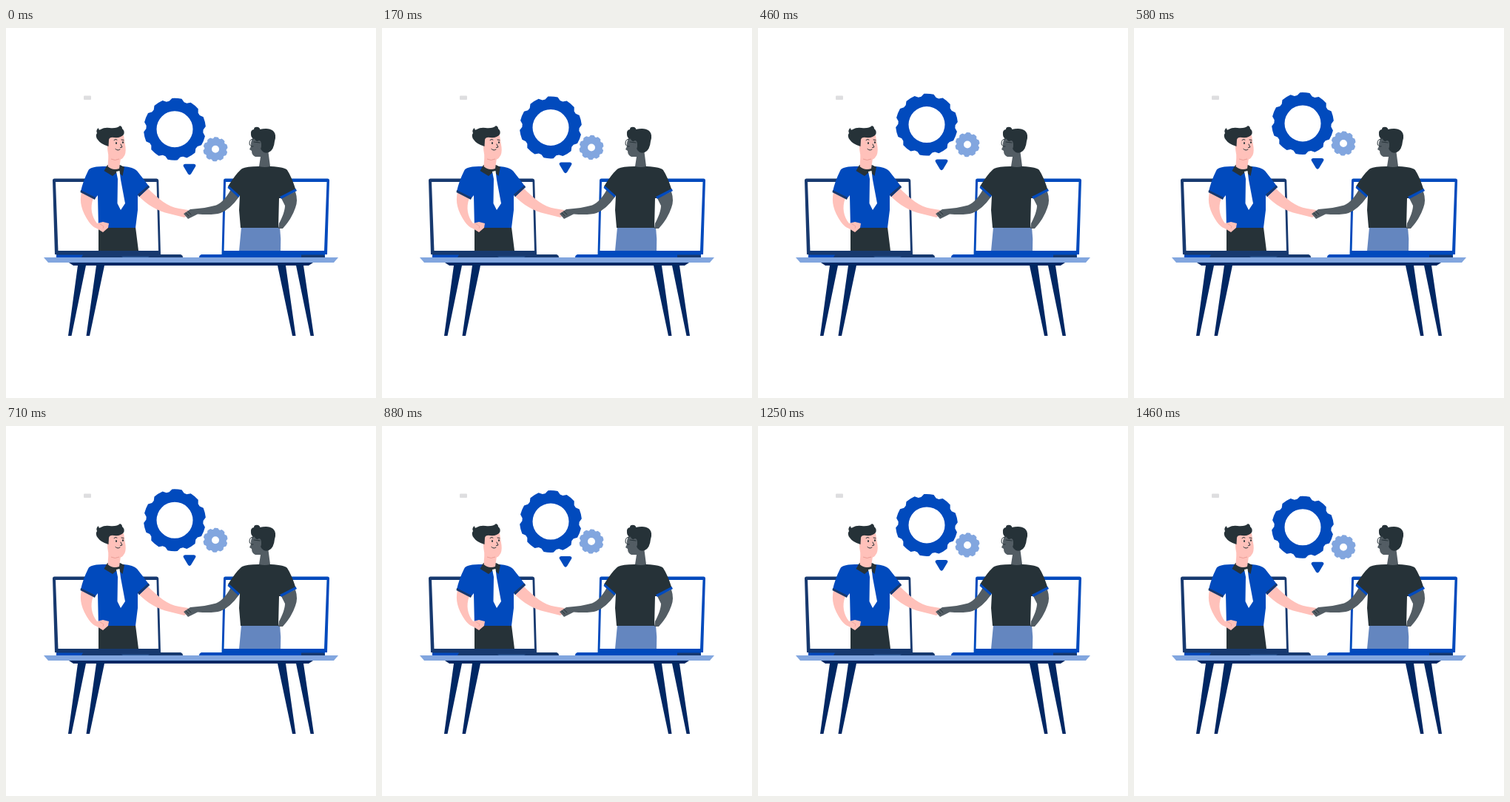
Recreate the animation shown at these times as an HTML page. Size 500x500 px, loop 1500 ms.

```html
<!DOCTYPE html>
<html lang="en">
<head>
<meta charset="utf-8">
<style>
  html, body { margin: 0; width: 100%; height: 100%; overflow: hidden; background: #fff; }
  svg { display: block; width: 100vw; height: 100vh; }
  .blue { fill: #014abd; }
  .sky { fill: #82a6df; }
  .navy { fill: #002763; }
  .steel { fill: #17396f; }
  .ink { fill: #263238; }
  .pink { fill: #ffc1ba; }
  .skin { fill: #535d64; }
  .line { fill: none; stroke: #263238; stroke-width: 1; stroke-linecap: round; }
</style>
</head>
<body>
<svg viewBox="0 0 500 500">
  <rect x="105" y="91.5" width="10" height="5.5" rx="1" fill="#dedee0"/>

  <g id="floating">
    <path id="bigGear" class="blue" fill-rule="evenodd"/>
    <path id="smallGear" class="sky" fill-rule="evenodd"/>
    <path class="blue" d="M242 184H254Q257.500 184.500 256 187.500L250.300 197Q248 200.500 245.700 197L240 187.500Q238.500 184.500 242 184Z"/>
  </g>

  <g id="laptops" fill-rule="evenodd">
    <path class="steel" d="M65.500 203.500H203.500Q206 203.500 206.200 206L209 306H66L63 206Q63 203.500 65.500 203.500ZM67 208L70.500 301H206L203.500 208Z"/>
    <path class="blue" d="M296.500 203.500H434.500Q437 203.500 437 206L434 306H291.500L294 206Q294 203.500 296.500 203.500ZM297 208L294.500 301H430L433.500 208Z"/>
  </g>

  <g id="leftPerson">
    <path class="ink" d="M125 269H175L179 301H125Z"/>
    <path class="pink" d="M179 227C190 238 205 248 221 251L241 256L248 251L246 246L234 244C218 241.500 206 231 191 216Z"/>
    <path class="blue" d="M136 187C121 187 113 188 111 193Q104 207 101 221L120 231L124 226L125 270H175L178 246V226L180 228L194 215Q185 203 177 193Q172 188 159 187Z"/>
    <path class="pink" d="M102 222C99 235 102 247 112 262Q117 269 123 271L131 276L138 270L139 264L131 262L123 264C116 255 113 243 118 230Z"/>
    <path class="steel" d="M101 219L121 229L120 232L100.500 222ZM178 225L192.500 212.500L194 215L180 228Z"/>
    <path class="ink" d="M137 185L132.500 193L144 200L151 194L157.500 200L160 188L154 185Z"/>
    <path class="pink" d="M138.500 172L137.500 187Q144 193 153 190L155 176Z"/>
    <path d="M149 194L153.500 193L155 205L161 237L155 246L150.500 237L151 204Z" fill="#fff"/>
    <path class="pink" d="M138 151L137 160Q137 165 138 170L139 176Q143 179 152 178Q157 178 159 174Q162.500 170 161.500 161L159 145H140Z"/>
    <path class="ink" d="M138.500 160Q128 157 124 151Q120 146 123 142Q121 138 125 135Q125 139 128 137Q133 134 140 135Q150 136 154 132Q157 133 157 136Q161 139 159 144Q155 149 146 148Q140 147 139 151Z"/>
    <ellipse class="ink" cx="149" cy="155.500" rx="1" ry="1.600"/>
    <ellipse class="ink" cx="158" cy="154.500" rx="1" ry="1.600"/>
    <path class="line" d="M146 151.500Q148 149.500 150 151M156 151L159 151.500M155 157L157 161L154.500 161.500M148 163.500Q151 166.500 154 164"/>
    <path d="M142 177Q147 180 153 177" fill="none" stroke="#eb9d96"/>
    <path d="M126 264L132 268L131 271" fill="none" stroke="#eb9d96" stroke-width=".7"/>
  </g>

  <g id="rightPerson">
    <path fill="#6486bf" d="M318 269H370Q372 285 371 301H315Z"/>
    <path class="skin" d="M391 221Q395 233 391 243Q386 258 374 271L368 271L369 264C374 255 377 246 377 240L372 230Z"/>
    <path class="skin" d="M304 218C298 229 292 236 284 239.500Q270 243.500 249 245L240 251L246 258L259 251.500Q280 253 290 250Q303 245 315 228Z"/>
    <path class="ink" d="M341 187Q325 187 319 190Q312 195 300 214L314 228L316 226L315 246L317 270H368L369 230L373 230L392 220Q386 201 380 192Q377 188 358 187Z"/>
    <path class="blue" d="M301 213L316 226.500L314 229L299.500 216ZM370 228L391.500 217L393 220L372 231Z"/>
    <path class="skin" d="M334 148Q330 154 331 160L329 164L332 166Q332 172 337 174L344 174L342 187Q350 189 357 187L354 164L348 147Z"/>
    <path class="ink" d="M331 144Q330 138 335 137Q335 133 341 134Q344 136 343 137Q355 134 361 139Q366 144 363 153Q362 165 355 168Q349 170 346 166Q343 163 345 158Q345 152 342 152Q338 155 336 150Q331 149 331 144Z"/>
    <ellipse class="skin" cx="342" cy="159" rx="3" ry="5"/>
    <path class="line" d="M334 150Q329 150 329 156Q330 161 334 160M335 154L343 155"/>
    <path class="line" d="M243 250L247 254M246 248L250 252" stroke-width=".7"/>
  </g>

  <g id="table">
    <path class="steel" d="M68 306H236Q239 307 239 310H68Z"/>
    <path class="blue" d="M68 306.500H104L102 310H68ZM264 306H431V310H261Q261 307 264 306Z"/>
    <path class="steel" d="M399 306.500H429Q431 307 431 310H399Z"/>
    <path fill="#2c5794" d="M156 308.500H194L192 310H158Z"/>
    <path class="sky" d="M51 310H449L443 317H57Z"/>
    <path class="navy" d="M85 317H415L409 321H91ZM97 321H108L88.500 416H84ZM122 321H133L113 416H108.500ZM367 321H378L391.500 416H387ZM392 321H402L416 416H411.500Z"/>
  </g>
</svg>
<script>
  const LOOP = 1500, LIFT = 10, TEETH = 10;
  const byId = id => document.getElementById(id);

  function gearPath(cx, cy, outer, root, hole, turn) {
    const step = 360 / TEETH;
    const at = (radius, degrees) => {
      const a = (degrees - 90) * Math.PI / 180;
      return `${(cx + radius * Math.cos(a)).toFixed(2)} ${(cy + radius * Math.sin(a)).toFixed(2)}`;
    };
    let d = '';
    for (let i = 0; i < TEETH; i++) {
      const mid = turn + i * step;
      d += `${i ? 'L' : 'M'}${at(root, mid - step * .42)}`
        + `L${at(outer, mid - step * .25)}`
        + `Q${at(outer + .4, mid)} ${at(outer, mid + step * .25)}`
        + `L${at(root, mid + step * .42)}`;
    }
    return `${d}ZM${cx - hole} ${cy}a${hole} ${hole} 0 1 0 ${2 * hole} 0a${hole} ${hole} 0 1 0 ${-2 * hole} 0Z`;
  }

  byId('bigGear').setAttribute('d', gearPath(228, 137, 42, 38.6, 24.5, 4));
  byId('smallGear').setAttribute('d', gearPath(283, 164, 16.5, 14.8, 5, 4));

  // Steady rise, then steady fall.
  const floating = byId('floating');
  function draw() {
    const phase = (performance.now() + 20) % LOOP / LOOP;
    const y = -LIFT * (1 - Math.abs(2 * phase - 1));
    floating.setAttribute('transform', `translate(0 ${y.toFixed(3)})`);
    requestAnimationFrame(draw);
  }
  draw();
</script>
</body>
</html>
```
